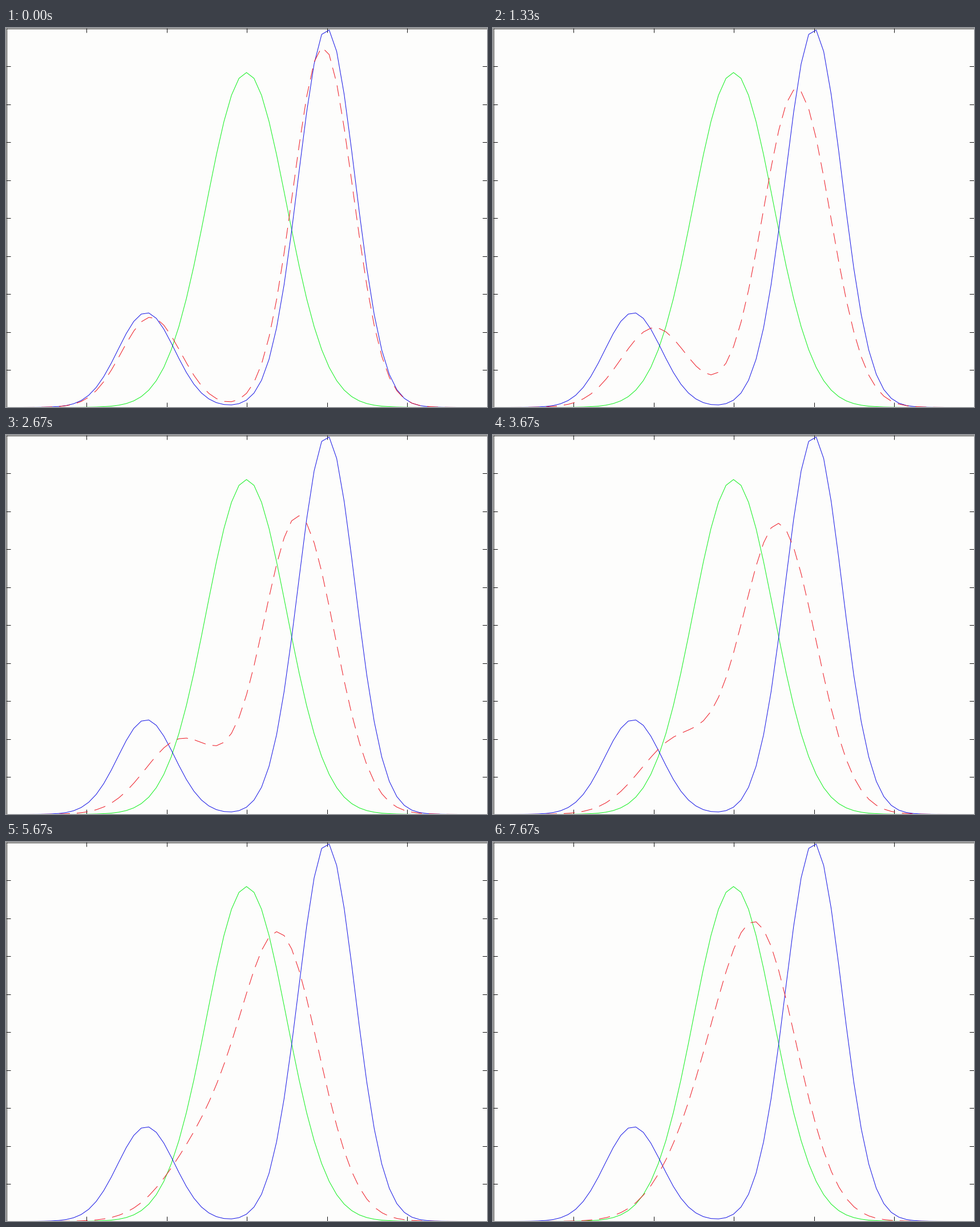
Write a matplotlib script that moves like this. It is 843x664 px and loops after 8 s.

```python
import numpy as np
import matplotlib.pyplot as plt
from matplotlib.animation import FuncAnimation

W, H, DPI = 843, 664, 100
LOOP_MS, TICK_MS, STEPS = 8000, 20, 24
PIXEL = 72 / DPI
UNIT = W / 12             # pixels per unit on the x axis
PEAK = 586.5              # pixel height of the unit normal
DECAY = 0.048             # shrink rate of the means per step
DASH, PERIOD = 19, 31

grid = np.linspace(-6, 6, 65)
grid_px = (grid + 6) * UNIT


def bell(mean, var):
    return PEAK / np.sqrt(var) * np.exp(-(grid - mean) ** 2 / (2 * var))


def mixture(shrink, var):
    """Two-bump density with its means pulled towards zero."""
    return 0.8 * bell(2 * shrink, var) + 0.2 * bell(-2.5 * shrink, var)


def diffused(step):
    a = np.exp(-DECAY * (step + 1))
    return mixture(a, 1 - 0.5 * a**2 + 0.07 * a**2 * (1 - a**2))


def dashed(x, y):
    """Cut a polyline into dashes measured along the major axis."""
    steps = np.maximum(np.abs(np.diff(x)), np.abs(np.diff(y)))
    length = np.concatenate([[0], np.cumsum(steps)])
    t = np.arange(0, length[-1], 0.5)
    off = t % PERIOD > DASH
    return np.interp(t, length, x), np.where(off, np.nan, np.interp(t, length, y))


fig = plt.figure(figsize=(W / DPI, H / DPI), dpi=DPI, facecolor="#fdfdfc")
ax = fig.add_axes([0, 0, 1, 1])
ax.set(xlim=(0, W), ylim=(0, H))
ax.axis("off")


def stroke(x, y, color):
    return ax.plot(x, y, color=color, lw=PIXEL, solid_capstyle="butt",
                   solid_joinstyle="round")[0]


def draw_frame():
    ink = "#101010"
    stroke([0, W], [H - 0.5] * 2, ink)
    stroke([0.5, 0.5], [0, H], ink)
    for k in range(1, 6):
        x = int(140.5 * k) + 0.5
        stroke([x, x], [0, 8], ink)
        stroke([x, x], [H - 8, H], ink)
    for k in range(1, 10):
        y = H - int(66.5 * k) - 0.5
        stroke([0, 8], [y, y], ink)
        stroke([W - 8, W], [y, y], ink)


draw_frame()
stroke(grid_px, bell(0, 1) - 0.5, "#10f01c")
stroke(grid_px, mixture(1, 0.5) - 0.5, "#1414e6")
moving = stroke([], [], "#ee1620")


def update(frame):
    # A step begins on the tick nearest to its start time.
    step = int((frame + 0.7) * TICK_MS * STEPS / LOOP_MS)
    moving.set_data(*dashed(grid_px, diffused(step) - 0.5))
    return (moving,)


anim = FuncAnimation(fig, update, frames=LOOP_MS // TICK_MS, interval=TICK_MS,
                     repeat=True, repeat_delay=0)
plt.show()
```
